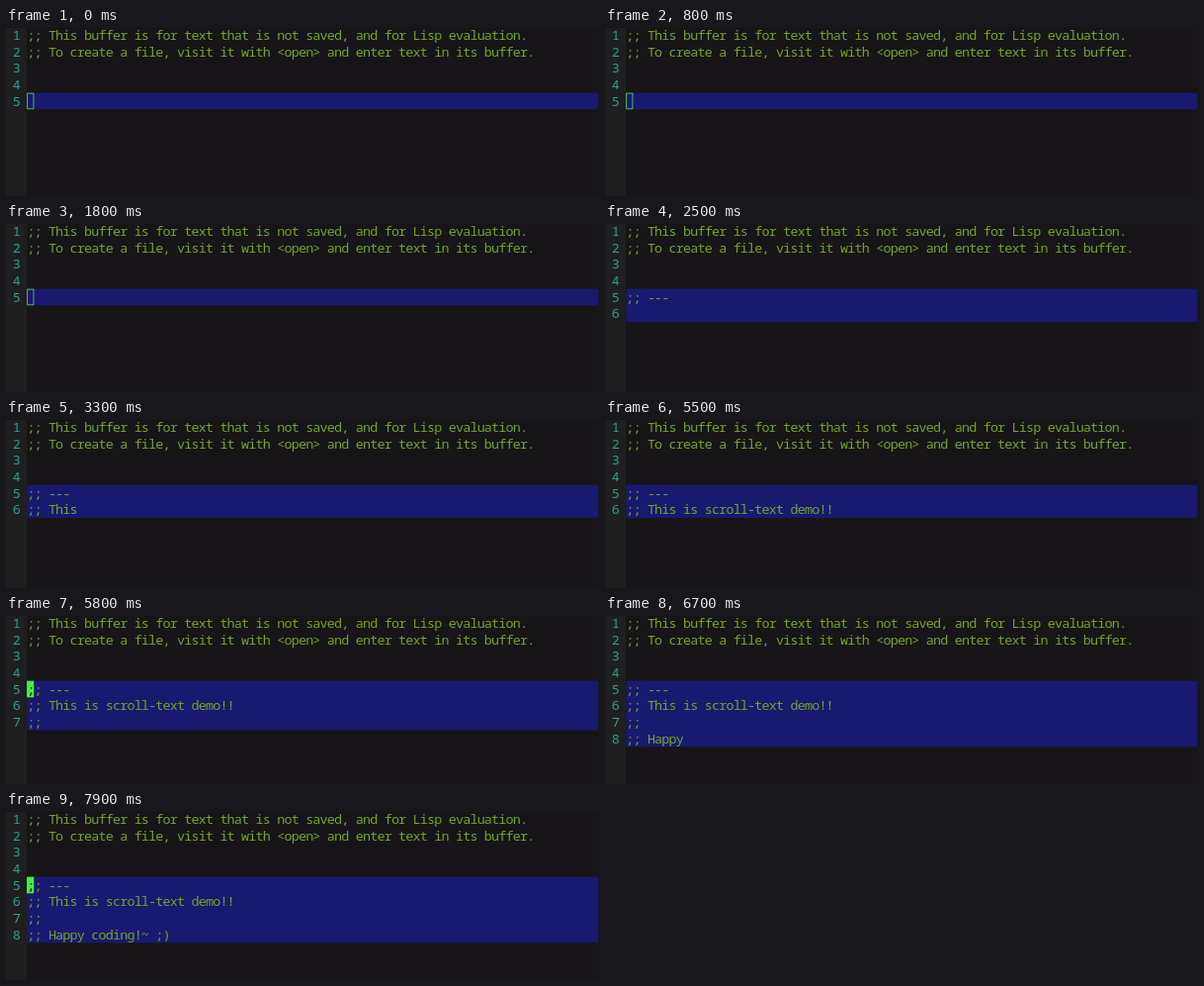
An HTML page that plays this animation: 600x170 px, repeating every 8000 ms.

```html
<!DOCTYPE html>
<html lang="en">
<head>
<meta charset="utf-8">
<title>Scroll text demo</title>
<style>
  html, body { margin: 0; width: 100%; height: 100%; overflow: hidden; background: #171517; }
  svg { display: block; width: 600px; height: 170px; }
  text {
    font: 13.4px "Noto Sans Mono", "DejaVu Sans Mono", monospace;
    letter-spacing: -.805px;
    white-space: pre;
    fill: #73a32c;
  }
  .num { fill: #309c8f; }
  .under { fill: #171517; }
</style>
</head>
<body>
<svg id="stage" viewBox="0 0 600 170">
  <rect width="600" height="170" fill="#171517"/>
  <rect width="21" height="170" fill="#1f1f20"/>
  <rect id="region" x="21.3" width="578" fill="#191970"/>
</svg>
<script>
const LOOP = 8000, PITCH = 16.68, LEFT = 21.2, FIRST = 4;
const HEAD = [
  ";; This buffer is for text that is not saved, and for Lisp evaluation.",
  ";; To create a file, visit it with <open> and enter text in its buffer.",
  "", ""
];
const MESSAGE = ";; ---\n;; This is scroll-text demo!! \n;;\n;; Happy coding!~ ;)";
const TYPE_START = 2000, KEY = 100, FIRST_CHARS = 2;
const BLINK = 1000, BLINK_ON = 800, BLINK_LEN = 500;

const stage = document.getElementById("stage");
const region = document.getElementById("region");

function add(tag, attrs, content = "") {
  const el = document.createElementNS("http://www.w3.org/2000/svg", tag);
  for (const key in attrs) el.setAttribute(key, attrs[key]);
  el.textContent = content;
  stage.append(el);
  return el;
}

const baseline = row => 11.9 + row * PITCH;
const rowTop = row => row * PITCH - 1.1;
const show = (el, on) => el.setAttribute("visibility", on ? "visible" : "hidden");

const rows = Array.from({ length: 8 }, (_, i) => ({
  num: add("text", { x: 6.7, y: baseline(i), class: "num" }, i + 1),
  line: add("text", { x: LEFT, y: baseline(i) }, HEAD[i] || "")
}));

const top5 = rowTop(FIRST);
region.setAttribute("y", top5);

const hollow = add("rect", {
  x: 21.6, y: top5 + .5, width: 6.3, height: PITCH - 1,
  fill: "none", stroke: "#4fcb55", "stroke-width": .9
});
const block = add("rect", { x: 21, y: top5, width: 7.2, height: PITCH, fill: "#43f03f" });
const under = add("text", { x: LEFT, y: baseline(FIRST), class: "under" }, ";");

function typedCount(t) {
  if (t < TYPE_START) return 0;
  return Math.min(MESSAGE.length, FIRST_CHARS + Math.floor((t - TYPE_START) / KEY));
}

function draw(t) {
  const count = typedCount(t);
  const lines = MESSAGE.slice(0, count).split("\n");
  for (let i = FIRST; i < rows.length; i++) {
    const text = lines[i - FIRST];
    rows[i].line.textContent = text || "";
    show(rows[i].num, text !== undefined);
  }
  region.setAttribute("height", lines.length * PITCH);

  const phase = (t - BLINK_ON + BLINK) % BLINK;
  const lit = count > 0 && phase < BLINK_LEN;
  show(hollow, count === 0);
  show(block, lit);
  show(under, lit);
}

const start = performance.now();
function tick() {
  draw((performance.now() - start) % LOOP);
  requestAnimationFrame(tick);
}
draw(0);
requestAnimationFrame(tick);
</script>
</body>
</html>
```
